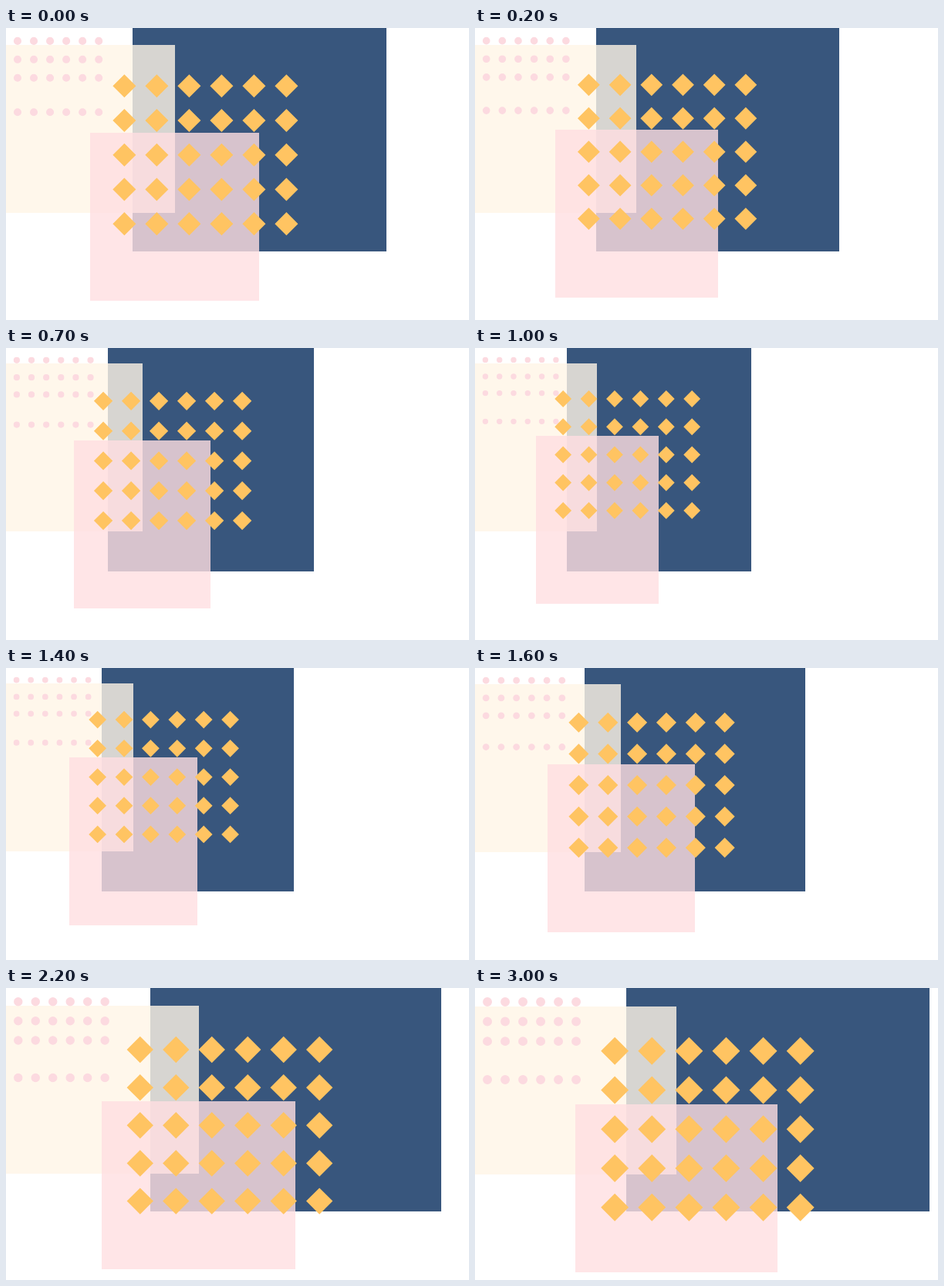
An HTML page that plays this animation: 600 by 379 pixels, repeating every 3.1 s.

```html
<!DOCTYPE html>
<html lang="en">
<head>
<meta charset="utf-8">
<title>Resizing shapes</title>
<style>
  html, body { margin: 0; width: 100%; height: 100%; overflow: hidden; background: #fff; }
  svg { display: block; width: 100vw; height: 100vh; }
</style>
</head>
<body>
<svg viewBox="0 0 600 379" xmlns="http://www.w3.org/2000/svg">
  <rect id="navy" fill="#38567d"/>
  <rect id="cream" fill="#fff5e6" fill-opacity=".8"/>
  <rect id="pink" fill="#ffdfe2" fill-opacity=".8"/>
  <path id="dots" fill="#fcdae0"/>
  <path id="diamonds" fill="#ffc462"/>
</svg>
<script>
const LOOP = 3100, STEP = 100;

// [time, layout width, speed per 100 ms]
const keys = [
  [0, 493, -8], [500, 429.5, -15.5], [600, 414, -15.3], [1000, 357.5, -11],
  [1200, 344, 0], [1400, 373, 24], [1800, 484, 26], [2200, 563.5, 15.5],
  [2400, 589, 0], [3100, 589, 0]
];

const el = id => document.getElementById(id);
const navy = el('navy'), cream = el('cream'), pink = el('pink');
const dots = el('dots'), diamonds = el('diamonds');

// Cubic Hermite interpolation between keys
function widthAt(t) {
  let i = 0;
  while (i < keys.length - 2 && t >= keys[i + 1][0]) i++;
  const [t0, a, va] = keys[i], [t1, b, vb] = keys[i + 1];
  const d = (t1 - t0) / 100, s = (t - t0) / (t1 - t0);
  const ease = s * s * (3 - 2 * s);
  return a + (b - a) * ease + d * s * (1 - s) * (va * (1 - s) - vb * s);
}

function box(node, left, top, right, bottom) {
  const [x, y, x2, y2] = [left, top, right, bottom].map(Math.round);
  node.setAttribute('x', x);
  node.setAttribute('y', y);
  node.setAttribute('width', x2 - x);
  node.setAttribute('height', y2 - y);
}

function grid(node, x0, dx, ys, shape) {
  let d = '';
  for (const y of ys)
    for (let c = 0; c < 6; c++) d += shape(x0 + c * dx, y);
  node.setAttribute('d', d);
}

const circle = r => (x, y) =>
  `M${x - r} ${y}a${r} ${r} 0 1 0 ${2 * r} 0a${r} ${r} 0 1 0 ${-2 * r} 0z`;
const diamond = r => (x, y) =>
  `M${x - r} ${y}l${r} ${-r} ${r} ${r} ${-r} ${r}z`;

function draw(t) {
  const w = widthAt(t);
  const part = f => (w + 1) * f - 1;

  box(navy, part(1 / 3), -1, w, 290);

  const creamTop = 13 + 0.0185 * w;
  box(cream, -1, creamTop, part(4 / 9), creamTop + 218);

  const pinkTop = 55.7 + 0.162 * w;
  box(pink, part(2 / 9), pinkTop, part(2 / 3), pinkTop + 218);

  const dotY = 11.43 + 0.0111 * w, dotGap = 15.45 + 0.0172 * w;
  grid(dots, 9.3 + 0.0115 * w, 11.04 + 0.0203 * w,
    [dotY, dotY + dotGap, dotY + 2 * dotGap, 58.7 + 0.1025 * w],
    circle(0.2 + 0.0098 * w));

  const topY = 41.7 + 0.068 * w, gapY = 13.87 + 0.0626 * w;
  grid(diamonds, 10.7 + 0.2894 * w, 10.7 + 0.0635 * w,
    [0, 1, 2, 3, 4].map(r => topY + r * gapY),
    diamond(0.0305 * w));
}

const start = performance.now();
function tick() {
  const t = (performance.now() - start) % LOOP;
  draw(Math.floor(t / STEP) * STEP);
  requestAnimationFrame(tick);
}
tick();
</script>
</body>
</html>
```
